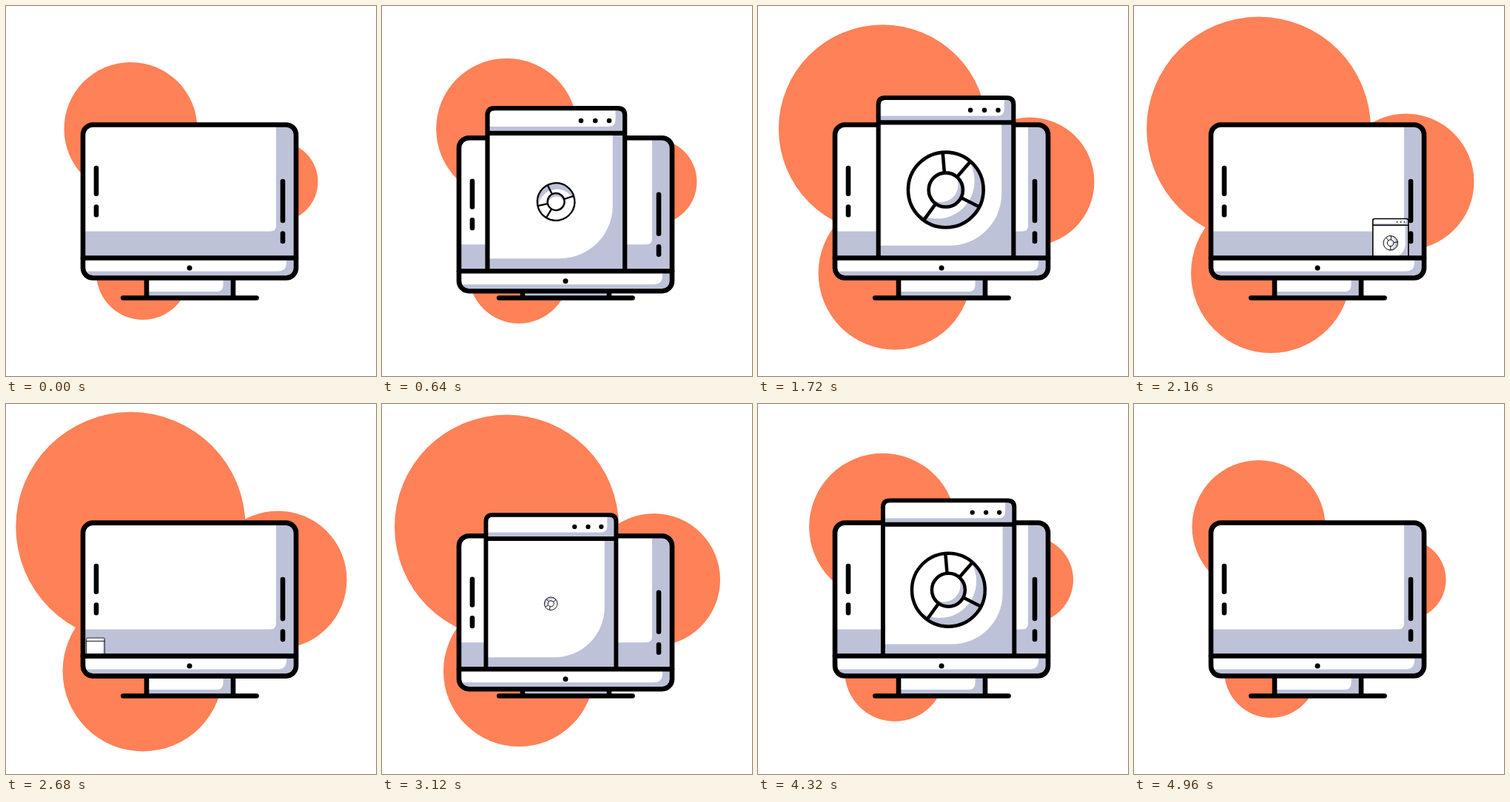
Write an HTML page that moves like this. It is 500x500 px and loops after 5 s.

```html
<!DOCTYPE html>
<html lang="en">
<head>
<meta charset="utf-8">
<title>Desktop chart</title>
<style>
html, body { margin: 0; width: 100%; height: 100%; overflow: hidden; background: #fff; }
svg { display: block; width: 100%; height: 100%; }
.ink { fill: none; stroke: #000; stroke-width: 6.6; stroke-linecap: round; stroke-linejoin: round; }
.thin { stroke-width: 5; stroke-linecap: butt; }
.w { fill: #fff; }
.g { fill: #bdc2d8; }
</style>
</head>
<body>
<svg viewBox="0 0 500 500">
  <defs>
    <clipPath id="above"><rect x="0" y="-50" width="500" height="390.5"/></clipPath>
    <clipPath id="ring"><circle r="55"/></clipPath>
    <clipPath id="hub"><circle r="25"/></clipPath>
  </defs>
  <g fill="#ff8157">
    <circle id="c0" cx="168.5" cy="166"/>
    <circle id="c1" cx="367.5" cy="237.5"/>
    <circle id="c2" cx="185" cy="361"/>
  </g>

  <g id="stand">
    <path class="g" d="M190 360H307V394H190Z"/>
    <path class="w" d="M190 360H293.5V377Q293.5 386 284.5 386H190Z"/>
    <path class="ink" style="stroke-linecap:butt" d="M190 360V394M307 360V394"/>
    <path class="ink" d="M158.3 394.5H338.5"/>
  </g>

  <g id="monitor">
    <rect class="g" x="104" y="160.5" width="288" height="207" rx="13.5"/>
    <path class="w" d="M104 304.5V174Q104 160.5 117.5 160.5H365V296.5Q365 304.5 357 304.5Z"/>
    <path class="w" d="M104 340H379V346.5Q379 358.5 367 358.5H104Z"/>
    <rect class="ink" x="104" y="160.5" width="288" height="207" rx="13.5"/>
    <path class="ink" d="M122 219V253.7M122 271.5V282.2M374 237V290M374 307.5V318"/>
    <g clip-path="url(#above)">
      <g id="win">
        <path class="g" d="M145 350V116Q145 106 155 106H332.5Q342.5 106 342.5 116V350Z"/>
        <path class="w" d="M145 132.5V116Q145 106 155 106H329V122.5Q329 132.5 319 132.5Z"/>
        <path class="w" d="M145 142H325V246A76 76 0 0 1 249 322H145Z"/>
        <path class="ink" d="M145 350V116Q145 106 155 106H332.5Q342.5 106 342.5 116V350M145 142H342.5"/>
        <circle cx="279.5" cy="124" r="3.5"/>
        <circle cx="300" cy="124" r="3.5"/>
        <circle cx="320" cy="124" r="3.5"/>
        <g id="donut">
          <circle class="g" r="55"/>
          <circle class="w" cx="-13" cy="-13" r="55" clip-path="url(#ring)"/>
          <circle class="g" r="25"/>
          <circle class="w" cx="-7" cy="-7" r="25" clip-path="url(#hub)"/>
          <circle class="ink thin" r="55"/>
          <circle class="ink thin" r="25"/>
          <path id="spokes" class="ink thin"/>
        </g>
      </g>
    </g>
    <path class="ink" d="M104 340.5H392"/>
    <circle cx="248" cy="354" r="3.5"/>
  </g>
</svg>
<script>
const LOOP = 5000, STEP = 40, CYCLE = 2560;
const $ = id => document.getElementById(id);

// radius of each backdrop circle at a few moments
const times = [0, 560, 640, 1120, 1240, 1680, 2160, 2500, 2800, 3120, 3360, 3760, 3920, 4480, 5000];
const radii = [
  [90, 94, 95.3, 111.3, 117.2, 139.3, 151.5, 155.3, 155, 151.5, 146.3, 127.5, 117.3, 95.3, 90],
  [54, 57.2, 58, 69.5, 73, 86.3, 92, 93.4, 92.6, 89.5, 85.3, 73.5, 68.3, 56.4, 54],
  [63, 67, 68, 83.8, 88.5, 102.8, 108, 109.3, 107.3, 102, 96.6, 82.5, 77, 65.8, 63]
];

const clamp = p => Math.max(0, Math.min(1, p));
const span = (t, a, b) => clamp((t - a) / (b - a));
const smooth = (t, a, b) => { const p = span(t, a, b); return p * p * (3 - 2 * p); };

// slope at a knot that keeps the curve free of overshoot
function slope(v, i) {
  if (i === 0 || i === v.length - 1) return 0;
  const l = (v[i] - v[i - 1]) / (times[i] - times[i - 1]);
  const r = (v[i + 1] - v[i]) / (times[i + 1] - times[i]);
  return l * r <= 0 ? 0 : 2 * l * r / (l + r);
}

function curve(v, t) {
  let i = 0;
  while (i < times.length - 2 && t >= times[i + 1]) i++;
  const h = times[i + 1] - times[i], p = (t - times[i]) / h, q = 1 - p;
  return v[i] * q * q * (1 + 2 * p) + v[i + 1] * p * p * (3 - 2 * p)
    + h * p * q * (slope(v, i) * q - slope(v, i + 1) * p);
}

$("spokes").setAttribute("d", [-94.7, -49, 27, 126].map(deg => {
  const a = deg * Math.PI / 180, x = Math.cos(a), y = Math.sin(a);
  return `M${25 * x} ${25 * y}L${55 * x} ${55 * y}`;
}).join(""));

function draw(t) {
  radii.forEach((v, i) => $("c" + i).setAttribute("r", curve(v, t)));

  const u = t < CYCLE ? t : t - CYCLE;
  const dip = 17.7 * (smooth(u, 100, 570) - smooth(u, 680, 1720));
  $("monitor").setAttribute("transform", `translate(0 ${dip})`);

  // the window grows out of the left corner and shrinks into the right one
  const leaving = u > 1300;
  const size = leaving ? 1 - span(u, 1340, 2240) ** 3 : 1 - (1 - span(u, 80, 1000)) ** 3;
  const ax = leaving ? 380 : 103.5, ay = 346;
  $("win").style.display = size > 0.001 ? "" : "none";
  $("win").setAttribute("transform",
    `translate(${ax} ${ay}) scale(${size}) translate(${-ax} ${-ay})`);

  const pop = smooth(u, 463, 822) * (1 - smooth(u, 1950, 2560));
  const turn = -180 * (1 - smooth(u, 390, 1260)) - 180 * smooth(u, 1950, 2680);
  $("donut").style.display = pop > 0.001 ? "" : "none";
  $("donut").setAttribute("transform",
    `translate(243.5 240.5) rotate(${turn}) scale(${pop})`);
}

const start = performance.now();
function tick() {
  const t = (performance.now() - start) % LOOP;
  draw(Math.floor(t / STEP) * STEP);
  requestAnimationFrame(tick);
}
draw(0);
requestAnimationFrame(tick);
</script>
</body>
</html>
```
